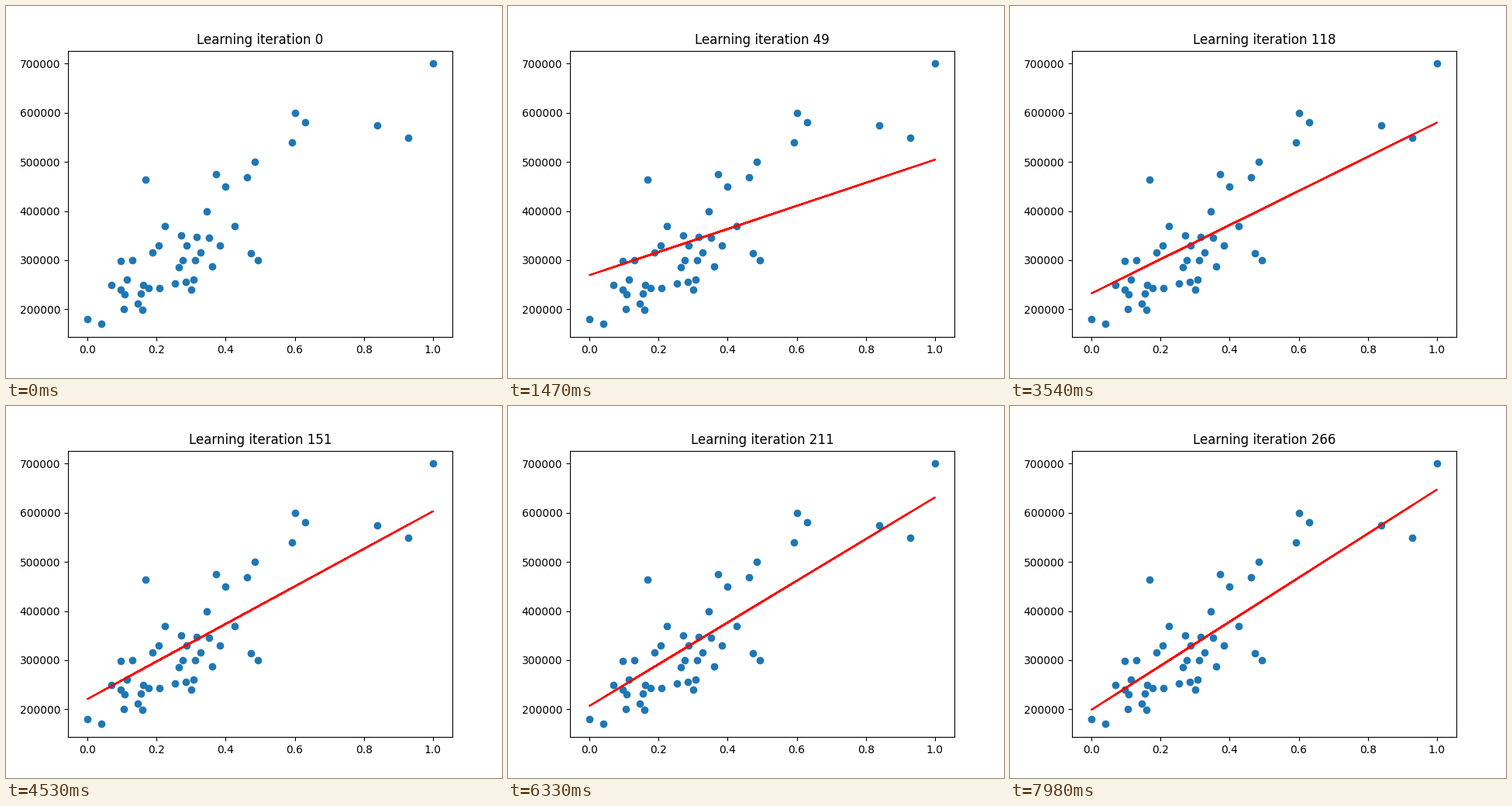
These frames come from a looping animation (640x480 px, 8 s). A matplotlib script:

```python
import matplotlib.pyplot as plt
import numpy as np
from matplotlib.animation import FuncAnimation

LOOP_MS = 8000
FRAMES = 267
RATE = 0.2

AREA = np.array([
    2104, 1600, 2400, 1416, 3000, 1985, 1534, 1427, 1380, 1494, 1940, 2000,
    1890, 4478, 1268, 2300, 1320, 1236, 2609, 3031, 1767, 1888, 1604, 1962,
    3890, 1100, 1458, 2526, 2200, 2637, 1839, 1000, 2040, 3137, 1811, 1437,
    1239, 2132, 4215, 2162, 1664, 2238, 2567, 1200, 852, 1852, 1203])
PRICE = 1000 * np.array([
    399.9, 329.9, 369, 232, 539.9, 299.9, 314.9, 199, 212, 242.5, 240, 347,
    330, 699.9, 259.9, 449.9, 299.9, 199.9, 500, 599, 252.9, 255, 242.9,
    259.9, 573.9, 249.9, 464.5, 469, 475, 299.9, 349.9, 169.9, 314.9, 579.9,
    285.9, 249.9, 229.9, 345, 549, 287, 368.5, 329.9, 314, 299, 179.9, 299.9,
    239.5])

x = (AREA - AREA.min()) / (AREA.max() - AREA.min())


def descend(steps):
    """Intercept and slope after each step of gradient descent."""
    a = b = 0.0
    path = []
    for _ in range(steps):
        path.append((a, b))
        err = a + b * x - PRICE
        a, b = a - RATE * err.mean(), b - RATE * (err * x).mean()
    return path


fits = descend(FRAMES)

fig, ax = plt.subplots(figsize=(6.4, 4.8), dpi=100)
ax.scatter(x, PRICE)
ax.set_xlim(-0.0563, 1.0563)
ax.set_ylim(ax.get_ylim())
line, = ax.plot([], [], color="red")
title = ax.set_title("Learning iteration 0")


def update(i):
    a, b = fits[i]
    line.set_data(x, a + b * x)
    title.set_text(f"Learning iteration {i}")
    return line, title


anim = FuncAnimation(fig, update, frames=FRAMES, interval=LOOP_MS / FRAMES,
                     repeat=True, repeat_delay=0, blit=False)
plt.show()
```
